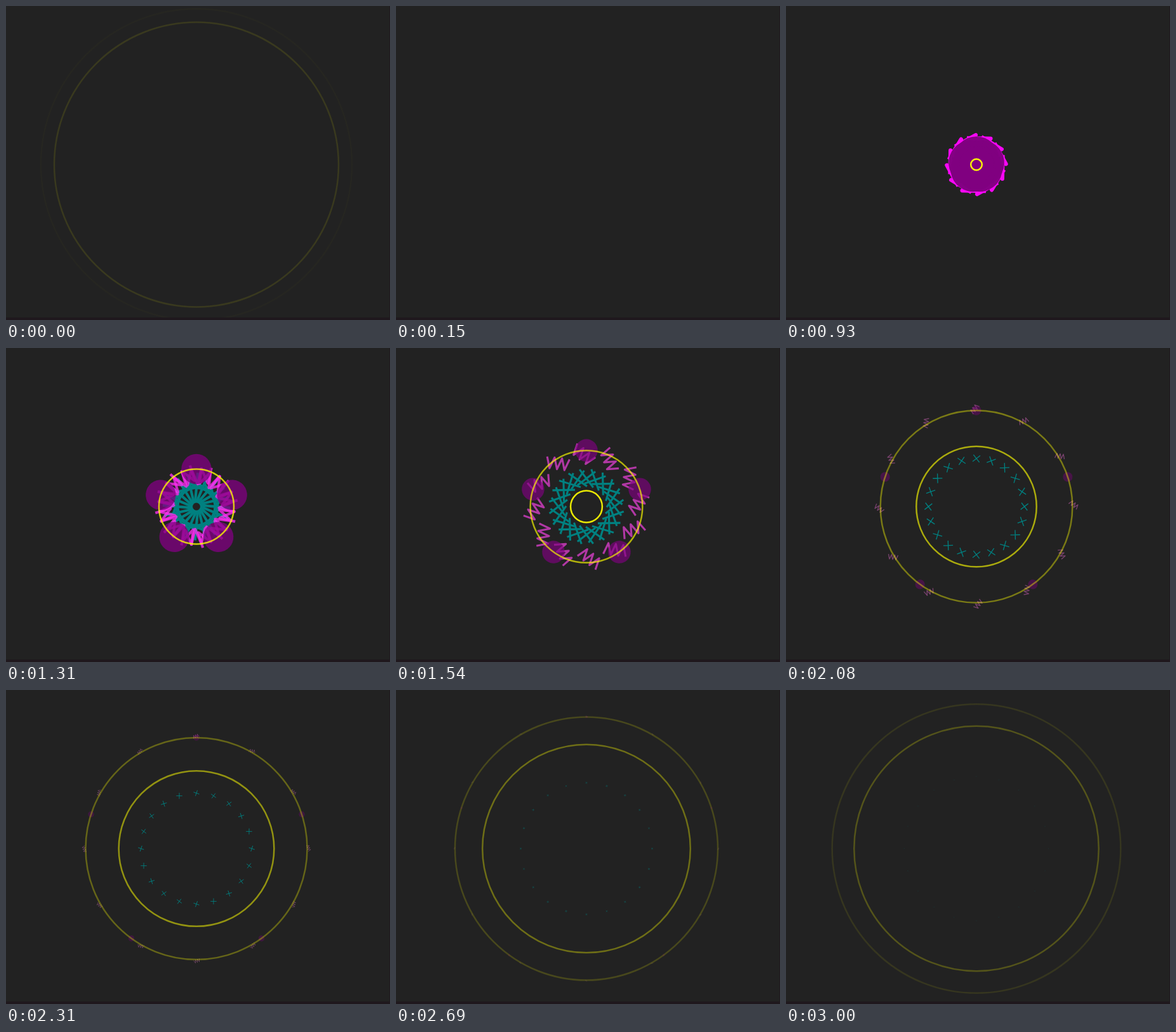
Write an HTML page with a canvas that moves like this. It is 605 px wide and 494 px high and loops after 3.08 s.

```html
<!DOCTYPE html>
<html lang="en">
<head>
<meta charset="utf-8">
<title>Burst</title>
<style>
html, body { margin: 0; width: 100%; height: 100%; overflow: hidden; background: #222; }
canvas { display: block; }
</style>
</head>
<body>
<canvas id="stage" width="605" height="494"></canvas>
<script>
const ctx = document.getElementById('stage').getContext('2d');
const TAU = Math.PI * 2;
const LOOP = 3080, CUT = 150, START = 865, DELAY = 489, SPAN = 2939;
const TAIL = 3431; // the loop opens on the tail of the previous burst
const REACH = 250;

const sinOut = p => Math.sin(Math.min(Math.max(p, 0), 1) * Math.PI / 2);
const mix = (a, b, p) => a.map((v, i) => Math.round(v + (b[i] - v) * p));

function each(count, radius, spin, draw) {
  for (let i = 0; i < count; i++) {
    ctx.save();
    ctx.rotate(i / count * TAU);
    ctx.translate(0, -radius);
    ctx.rotate(spin);
    ctx.beginPath();
    draw();
    ctx.restore();
  }
}

function ring(e) {
  if (e <= 0) return;
  ctx.globalAlpha = 1 - e;
  ctx.lineWidth = 2.5;
  ctx.strokeStyle = '#ff0';
  ctx.beginPath();
  ctx.arc(0, 0, REACH * e, 0, TAU);
  ctx.stroke();
}

function burst(e) {
  const size = 37.8 * Math.pow(1 - e, 1.73);
  ctx.lineWidth = size * 0.175;
  ctx.lineJoin = 'round';

  ctx.globalAlpha = 1;
  ctx.strokeStyle = 'teal';
  each(20, REACH / 2 * e, -TAU * e, () => {
    ctx.moveTo(-size, 0);
    ctx.lineTo(size, 0);
    ctx.moveTo(0, -size);
    ctx.lineTo(0, size);
    ctx.stroke();
  });

  ctx.globalAlpha = 1 - e;
  ctx.strokeStyle = `rgb(${mix([255, 0, 255], [255, 192, 203], e)})`;
  each(12, REACH * e, TAU * e, () => {
    for (let k = 0; k < 7; k++) ctx.lineTo(k % 2 * size, (k / 3 - 1) * size);
    ctx.stroke();
  });

  ctx.fillStyle = 'purple';
  each(5, REACH * e, 0, () => {
    ctx.arc(0, 0, size, 0, TAU);
    ctx.fill();
  });
}

function render(t) {
  ctx.globalAlpha = 1;
  ctx.fillStyle = '#222';
  ctx.fillRect(0, 0, 605, 494);

  if (t < CUT || t >= 925) {
    const age = (t < CUT ? t + TAIL : t) - START;
    const e = sinOut(age / SPAN);
    ctx.save();
    ctx.translate(300, 249.5);
    burst(e);
    ring(e);
    ring(sinOut((age - DELAY) / SPAN));
    ctx.restore();
  }

  ctx.globalAlpha = 1;
  ctx.fillStyle = '#1f181d';
  ctx.fillRect(0, 490, 605, 4);
  ctx.fillRect(604, 0, 1, 494);
}

const begin = performance.now();
function tick() {
  render((performance.now() - begin) % LOOP);
  requestAnimationFrame(tick);
}
tick();
</script>
</body>
</html>
```
